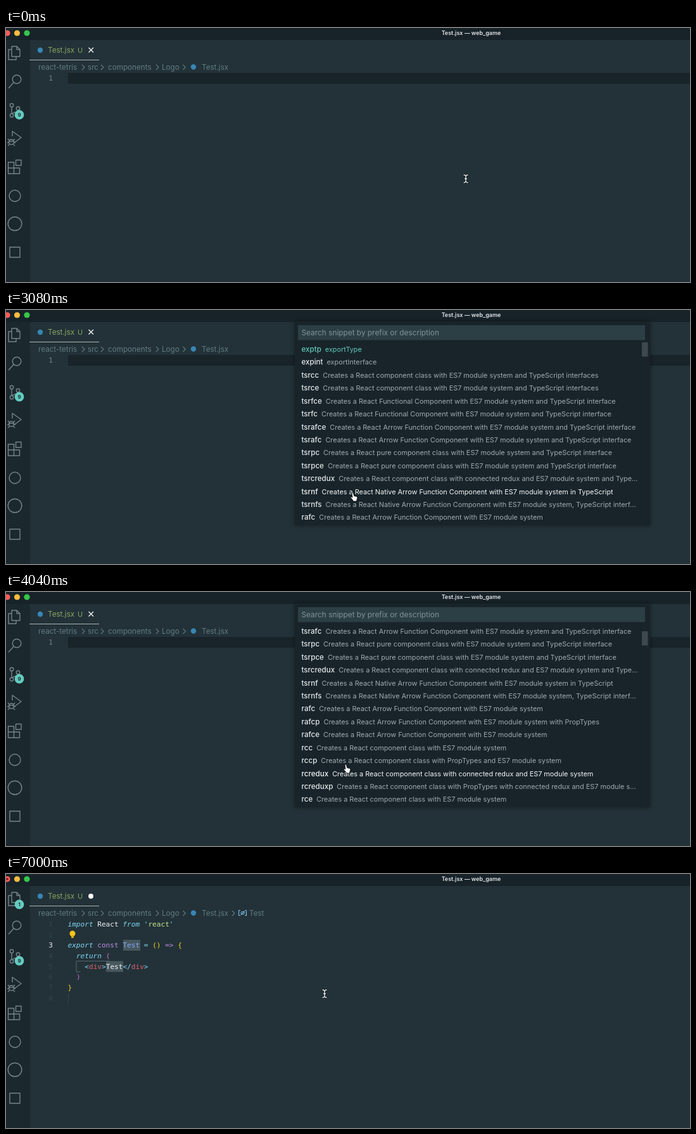
Recreate the animation shown at these times as an HTML page. Size 1080 by 401 pixels, loop 7480 ms.

```html
<!DOCTYPE html>
<html lang="en">
<head>
<meta charset="utf-8">
<title>Snippet search</title>
<style>
html, body { margin: 0; width: 100%; height: 100%; overflow: hidden; background: #233238; }
svg { display: block; width: 1080px; height: 401px; }
text { font: 11.7px Inter, "Open Sans", sans-serif; white-space: pre; }
.title { font-size: 8.95px; font-weight: 600; fill: #e3e7e8; text-anchor: middle; }
.crumb { fill: #607b83; }
.chev { fill: none; stroke: #607b83; stroke-width: 1.1; }
.tab { fill: #87a562; }
.icons { fill: none; stroke: #75858a; stroke-width: 1.4; stroke-linejoin: round; }
.badge circle { fill: #64cbbf; }
.badge text { font-size: 8px; font-weight: 700; fill: #16312f; text-anchor: middle; }
.code text, .num { font: 11.1px "DejaVu Sans Mono", "Liberation Mono", monospace; fill: #eef3f4; }
.num { fill: #6f858c; text-anchor: end; }
.num.dim { fill: #30444b; }
.code .kw { fill: #7fd6f5; font-style: italic; }
.code .op { fill: #7fd6f5; }
.code .str { fill: #c3e88d; }
.code .decl { fill: #b98be0; }
.code .fn { fill: #82aaff; }
.code .tag { fill: #e0606c; }
.code .b1 { fill: #f7cf1d; }
.code .b2 { fill: #cf6fd0; }
.sel { fill: #47585e; }
.caret { fill: #f3d12e; }

.box { fill: #18242a; filter: drop-shadow(0 0 3px rgba(0, 0, 0, .45)); }
.hint { fill: #829397; font-size: 11.85px; }
.row { fill: #e4e9ea; font-size: 11.6px; font-weight: 500; }
.row .desc { fill: #a0aaad; font-size: 10.86px; font-weight: 400; }
.row.hover, .row.hover .desc { fill: #f4f7f7; }
.row.focus, .row.focus .desc { fill: #62c8b8; }

/* One shared 7480 ms loop */
.blank, .done, .panel, .hand, .beam, .caret1, .caret2, .caret3,
.unsaved, .bulb, .symbol, .mouse, .list, .thumb { animation: 7480ms step-end infinite; }
.blank { animation-name: blank; }
.done { animation-name: done; }
.panel, .hand { animation-name: panel; }
.beam { animation-name: beam; }
.caret1 { animation-name: caret1; }
.caret2 { animation-name: caret2; }
.caret3 { animation-name: caret3; }
.unsaved { animation-name: unsaved; }
.bulb { animation-name: bulb; }
.symbol { animation-name: symbol; }
.mouse { animation-name: mouse; animation-timing-function: ease-in-out; }
.list, .thumb { animation-timing-function: cubic-bezier(.333, .667, .667, 1); }
.list { animation-name: list; }
.thumb { animation-name: thumb; }

@keyframes blank { 0% { opacity: 1 } 86.63%, 100% { opacity: 0 } }
@keyframes done { 0% { opacity: 0 } 86.63%, 100% { opacity: 1 } }
@keyframes panel { 0% { opacity: 0 } 28.74% { opacity: 1 } 86.63%, 100% { opacity: 0 } }
@keyframes beam { 0% { opacity: 1 } 28.74% { opacity: 0 } 86.63%, 100% { opacity: 1 } }
@keyframes caret1 {
  0%, 18.45%, 28.74%, 100% { opacity: 0 }
  11.76%, 25.13% { opacity: 1 }
}
@keyframes caret2 {
  0%, 35.43%, 48.8%, 62.17%, 75.53%, 86.63%, 100% { opacity: 0 }
  28.74%, 42.11%, 55.48%, 68.85%, 82.22% { opacity: 1 }
}
@keyframes caret3 { 0% { opacity: 0 } 86.63% { opacity: 1 } 93.5%, 100% { opacity: 0 } }
@keyframes unsaved { 0% { opacity: 0 } 88.2%, 100% { opacity: 1 } }
@keyframes bulb { 0% { opacity: 0 } 90.4%, 100% { opacity: 1 } }
@keyframes symbol { 0% { opacity: 0 } 91.4%, 100% { opacity: 1 } }
@keyframes mouse {
  0%, 30.75% { transform: translate(726px, 238px) }
  38.77%, 50.13% { transform: translate(549px, 295px) }
  54.01% { transform: translate(538px, 279px); animation-timing-function: linear }
  66.84% { transform: translate(505px, 198px); animation-timing-function: ease-out }
  70.86%, 100% { transform: translate(503px, 189px) }
}
@keyframes list {
  0%, 41.71% { transform: translateY(0) }
  48.33%, 100% { transform: translateY(-143px) }
}
@keyframes thumb {
  0%, 41.71% { transform: translateY(0) }
  48.33%, 100% { transform: translateY(11px) }
}
</style>
</head>
<body>
<svg viewBox="0 0 1080 401">
  <defs>
    <clipPath id="view"><rect x="457" y="50" width="560" height="288"/></clipPath>
  </defs>
  <rect width="1080" height="401" fill="#233238"/>
  <rect width="1080" height="19" fill="#172329"/>
  <rect y="19" width="38" height="382" fill="#1b282e"/>

  <circle cx="2" cy="8" r="4.6" fill="#fb5c57"/>
  <circle class="done" cx="2" cy="8" r="1.7" fill="#7c1513"/>
  <circle cx="17.5" cy="8" r="4.6" fill="#fcbc3f"/>
  <circle cx="33" cy="8" r="4.6" fill="#34c749"/>
  <text class="title" x="734.5" y="11">Test.jsx — web_game</text>

  <g class="icons">
    <path d="M9 29h8l5 5v11H9zM17 29v5h5M9 34H4v16h12v-5"/>
    <circle cx="17" cy="81" r="6.8"/><path d="M12 86l-8 9"/>
    <circle cx="9" cy="122" r="2.7"/><circle cx="9" cy="138" r="2.7"/><circle cx="19" cy="127" r="2.7"/>
    <path d="M9 125v10M19 130c0 4-9 2-9 6"/>
    <path d="M10 171v-8l14 10-11 8"/><circle cx="8.5" cy="180" r="4"/>
    <path d="M3 175l3 3M14 175l-3 3M2 181h3M12 181h3M3 186l3-3M14 186l-3-3M5 179h7"/>
    <path d="M3.5 212h9v18h-9zM3.5 221h18v9h-18zM15.5 208.5h8.500v8.500h-8.500z"/>
    <circle cx="14" cy="265" r="9"/>
    <circle cx="14" cy="309" r="10.8"/>
    <rect x="6" y="346" width="16" height="16"/>
  </g>
  <g class="badge">
    <circle cx="21" cy="137" r="7.4"/><text x="21" y="140">9</text>
    <g class="unsaved"><circle cx="21" cy="48" r="7.4"/><text x="21" y="51">1</text></g>
  </g>

  <rect x="37" y="50" width="110" height="1" fill="#a9b4b6"/>
  <circle cx="54" cy="35" r="4.2" fill="#3786b4"/>
  <text class="tab" x="66" y="39">Test.jsx</text>
  <text class="tab" x="113" y="39" style="font-size:11px">U</text>
  <path class="blank" d="M130.5 31l7.5 7.5M138 31l-7.5 7.5" stroke="#f0f3f3" stroke-width="1.4"/>
  <circle class="done" cx="134" cy="35" r="3.9" fill="#fff"/>

  <text class="crumb" x="51" y="65.5">react-tetris</text>
  <text class="crumb" x="129" y="65.5">src</text>
  <text class="crumb" x="161" y="65.5">components</text>
  <text class="crumb" x="246" y="65.5">Logo</text>
  <text class="crumb" x="309" y="65.5">Test.jsx</text>
  <path class="chev" d="M120 58l4 4-4 4M150 58l4 4-4 4M237 58l4 4-4 4M279.5 58l4 4-4 4"/>
  <circle cx="296" cy="61.5" r="4.2" fill="#3786b4"/>
  <g class="symbol">
    <path class="chev" d="M357 58l4 4-4 4"/>
    <path d="M370 57.5h-2.5v8h2.5M377 57.5h2.5v8h-2.5M371 64.5l5.5-6" fill="none" stroke="#74b6dc" stroke-width="1.2"/>
    <ellipse cx="373.7" cy="61.5" rx="2.8" ry="2.2" fill="none" stroke="#74b6dc"/>
    <text class="crumb" x="384" y="65.5">Test</text>
  </g>

  <g class="blank">
    <rect x="98" y="71" width="982" height="17" fill="#182429"/>
    <text class="num" x="74" y="83">1</text>
    <rect class="caret caret1" x="97.5" y="71" width="1.6" height="17"/>
  </g>

  <g class="code done">
    <g id="nums"></g>
    <rect class="sel" x="185" y="104" width="27" height="17"/>
    <rect class="sel" x="158" y="137.5" width="27" height="17"/>
    <path d="M164 137.5h-53v17h6" fill="none" stroke="#53656a"/>
    <path d="M98.5 188v17" stroke="#30444b"/>
    <text x="97.5" y="83"><tspan class="kw">import</tspan> React <tspan class="kw">from</tspan> <tspan class="op">'</tspan><tspan class="str">react</tspan><tspan class="op">'</tspan></text>
    <g class="bulb">
      <circle cx="105" cy="94" r="4.5" fill="#fbc51b"/>
      <path d="M103 97h4v4h-4z" fill="#d9a514"/>
    </g>
    <text x="97.5" y="116.3"><tspan class="kw">export</tspan> <tspan class="decl">const</tspan> <tspan class="fn">Test</tspan> <tspan class="op">=</tspan> <tspan class="b1">()</tspan> <tspan class="decl">=&gt;</tspan> <tspan class="b1">{</tspan></text>
    <text x="110.9" y="133"><tspan class="kw">return</tspan> <tspan class="b2">(</tspan></text>
    <text x="124.3" y="149.6"><tspan class="op">&lt;</tspan><tspan class="tag">div</tspan><tspan class="op">&gt;</tspan>Test<tspan class="op">&lt;/</tspan><tspan class="tag">div</tspan><tspan class="op">&gt;</tspan></text>
    <text class="b2" x="110.9" y="166.3">)</text>
    <text class="b1" x="97.5" y="183">}</text>
    <g class="caret caret3">
      <rect x="211.5" y="104" width="1.6" height="17"/>
      <rect x="184.5" y="137.5" width="1.6" height="17"/>
    </g>
  </g>

  <g class="panel">
    <rect class="box" x="456" y="18" width="561" height="322"/>
    <rect x="461" y="24" width="548" height="23.5" fill="#2c3f45"/>
    <text class="hint" x="466.5" y="40">Search snippet by prefix or description</text>
    <rect class="caret2" x="466" y="28" width="1.2" height="15" fill="#c9d2d4"/>
    <g clip-path="url(#view)"><g class="list"></g></g>
    <rect class="thumb" x="1004" y="51" width="9.5" height="22.5" fill="#3c484d"/>
  </g>

  <g class="mouse">
    <g class="beam" fill="none" stroke-linecap="round">
      <path d="M-3 -6q3 0 3 3q0 -3 3 -3M0 -3v6M-3 6q3 0 3 -3q0 3 3 3M-1.5 0h3" stroke="#111a1d" stroke-width="3"/>
      <path d="M-3 -6q3 0 3 3q0 -3 3 -3M0 -3v6M-3 6q3 0 3 -3q0 3 3 3M-1.5 0h3" stroke="#eef1f1" stroke-width="1.3"/>
    </g>
    <path class="hand" d="M-3 -6q1.5 -1.5 2.5 0l1 4.5 4 1q1.5 .5 1.3 2l-.8 3 -.5 2.5h-5l-1.5 -2.5 -3 -3.5q0 -1.5 1.8 -.8l1.2 .8z" fill="#fff" stroke="#0d1416" stroke-width=".9"/>
  </g>
</svg>
<script>
const ROW = 20.42, TOP = 51.8;
const ES7 = 'ES7 module system';
const TS = ES7 + ' and TypeScript interface';
const cls = 'React component class with ';
const arrow = 'React Arrow Function Component with ';
const redux = 'connected redux and ' + ES7;

const snippets = [
  ['exptp', 'exportType'],
  ['expint', 'exportInterface'],
  ['tsrcc', cls + TS + 's'],
  ['tsrce', cls + TS + 's'],
  ['tsrfce', 'React Functional Component with ' + TS],
  ['tsrfc', 'React Functional Component with ' + TS],
  ['tsrafce', arrow + TS],
  ['tsrafc', arrow + TS],
  ['tsrpc', 'React pure component class with ' + TS],
  ['tsrpce', 'React pure component class with ' + TS],
  ['tsrcredux', cls + redux + ' and Type...'],
  ['tsrnf', 'React Native Arrow Function Component with ' + ES7 + ' in TypeScript'],
  ['tsrnfs', 'React Native Arrow Function Component with ' + ES7 + ', TypeScript interf...'],
  ['rafc', arrow + ES7],
  ['rafcp', arrow + ES7 + ' with PropTypes'],
  ['rafce', arrow + ES7],
  ['rcc', cls + ES7],
  ['rccp', cls + 'PropTypes and ' + ES7],
  ['rcredux', cls + redux],
  ['rcreduxp', cls + 'PropTypes with connected redux and ES7 module s...'],
  ['rce', cls + ES7]
];

const $ = s => document.querySelector(s);

function add(parent, tag, attrs, text = '') {
  const el = document.createElementNS('http://www.w3.org/2000/svg', tag);
  for (const name in attrs) el.setAttribute(name, attrs[name]);
  el.textContent = text;
  return parent.appendChild(el);
}

for (let n = 1; n <= 8; n++) {
  add($('#nums'), 'text', { class: n === 3 ? 'num' : 'num dim', x: 74, y: 83 + (n - 1) * 16.67 }, n);
}

const list = $('.list'), mouse = $('.mouse');
const rows = snippets.map(([prefix, about], i) => {
  const row = add(list, 'text', { class: i ? 'row' : 'row focus', x: 466.5, y: 66 + i * ROW }, prefix);
  add(row, 'tspan', { class: 'desc', dx: 6 }, i < 2 ? about : 'Creates a ' + about);
  return row;
});

// The row under the pointer depends on both the scroll and the pointer path.
const shiftY = el => new DOMMatrix(getComputedStyle(el).transform).f;

function hover() {
  const at = Math.floor((shiftY(mouse) - shiftY(list) - TOP) / ROW);
  rows.forEach((row, i) => row.classList.toggle('hover', i === at));
  requestAnimationFrame(hover);
}
hover();
</script>
</body>
</html>
```
